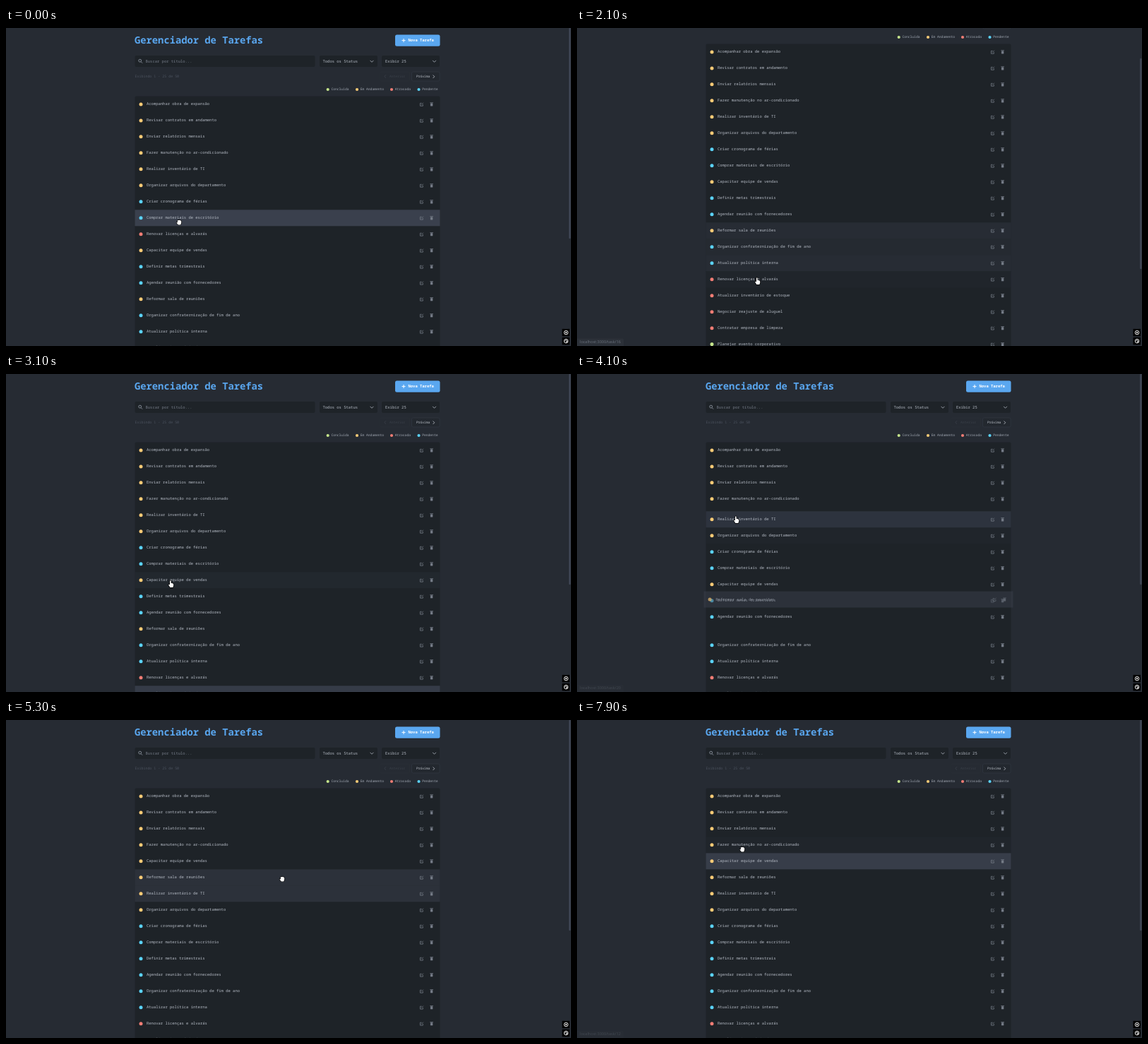
An HTML page with a canvas for the animation above (8 s loop, 800 px wide and 450 px high).

```html
<!DOCTYPE html>
<html lang="pt-BR">
<head>
<meta charset="utf-8">
<title>Gerenciador de Tarefas</title>
<style>
html, body { margin: 0; width: 100%; height: 100%; overflow: hidden; background: #262b33; }
canvas { display: block; }
</style>
</head>
<body>
<canvas id="stage" width="800" height="450"></canvas>
<script>
const ctx = document.getElementById('stage').getContext('2d');
const LOOP = 8000, STEP = 100, SLIDE = 300, FADE = 300;
const TOP = 96.4, ROW = 22.985, LEFT = 182.5, WIDTH = 432;
const DOT = { g: '#c5e58b', y: '#fccb76', r: '#f27d75', b: '#5bd3f9' };
const BG = '#262b33', PANEL = '#1e2328', BLUE = '#5aa7f0';

// The first letter of each line is the status colour.
const parse = text => text.trim().split('\n').map(s => ({ dot: DOT[s[0]], name: s.slice(2) }));
const firstPage = parse(`
y Acompanhar obra de expansão
y Revisar contratos em andamento
y Enviar relatórios mensais
y Fazer manutenção no ar-condicionado
y Realizar inventário de TI
y Organizar arquivos do departamento
b Criar cronograma de férias
b Comprar materiais de escritório
r Renovar licenças e alvarás
y Capacitar equipe de vendas
b Definir metas trimestrais
b Agendar reunião com fornecedores
y Reformar sala de reuniões
b Organizar confraternização de fim de ano
b Atualizar política interna
r Atualizar inventário de estoque
r Negociar reajuste de aluguel
r Contratar empresa de limpeza
g Planejar evento corporativo
g Revisar plano de segurança
g Atualizar cadastro de clientes
g Preparar folha de pagamento
g Conferir notas fiscais
g Trocar lâmpadas do corredor
g Arquivar documentos antigos`);
const secondPage = parse(`
b Treinar equipe para atendimento telefônico
b Criar roteiro de atendimento ao cliente
b Agendar inspeção predial
y Atualizar mural de aniversariantes
r Recolher assinaturas em documentos
y Atualizar quadro de avisos interno
y Solicitar orçamentos para reforma
g Inspecionar extintores de incêndio
y Preparar lista de presença para evento
g Organizar almoxarifado
g Montar kit de boas-vindas para novos funcionários
b Reservar hotel para viagem de negócios
y Criar lista de fornecedores alternativos
g Atualizar informações no site institucional
b Criar manual de uso da sala de reunião
b Revisar lista de ramais`);

const moves = [
  { at: 1200, from: 8, to: 14 },
  { at: 4000, from: 11, to: 4 },
  { at: 4800, from: 9, to: 4 },
];
const cursorKeys = [
  [0, 245, 275], [200, 242, 290], [600, 240, 290], [1150, 248, 430], [1700, 250, 428],
  [1925, 256, 358], [2150, 256, 358], [2500, 240, 300], [3100, 234, 297], [3400, 236, 360],
  [3900, 236, 360], [3930, 226, 206], [4150, 226, 206], [4450, 235, 314], [4700, 235, 314],
  [4800, 240, 200], [4920, 260, 200], [5000, 320, 245], [5160, 350, 243], [5170, 352, 228],
  [5300, 391, 225], [5700, 594, 70], [6000, 594, 70], [6300, 563, 70], [6700, 563, 70],
  [7200, 240, 255], [7550, 240, 202], [7880, 236, 197], [7900, 234, 183],
];
const scrollKeys = [
  [1990, 0], [2000, 50], [2080, 50], [2085, 74], [2100, 74], [2300, 152], [3050, 152], [3065, 0],
];
const linkHints = [[500, 700, 16], [1550, 2300, 16], [3750, 3950, 20], [4550, 4900, 12], [7350, 7750, 12]];

const clamp = v => Math.max(0, Math.min(1, v));
const smooth = p => p * p * (3 - 2 * p);
function track(keys, t) {
  const i = keys.findIndex(k => k[0] > t);
  if (i < 0) return keys.at(-1).slice(1);
  if (!i) return keys[0].slice(1);
  const a = keys[i - 1], b = keys[i], p = (t - a[0]) / (b[0] - a[0]);
  return a.slice(1).map((v, j) => v + (b[j + 1] - v) * p);
}

const onSecondPage = t => t >= 5800 && t < 6500;

// Rows with their centre y in page coordinates.
function layout(t) {
  if (onSecondPage(t)) return secondPage.map((task, i) => ({ task, y: TOP + (i + .5) * ROW }));
  let order = firstPage, before = order, p = 1, lifted = null;
  for (const m of moves.filter(m => t >= m.at)) {
    before = order;
    order = before.slice();
    const [task] = order.splice(m.from, 1);
    order.splice(m.to, 0, task);
    p = clamp((t - m.at) / SLIDE);
    lifted = p < 1 ? task : null;
  }
  const rows = order.map((task, i) => {
    const slot = before.indexOf(task);
    return { task, y: TOP + (slot + (i - slot) * smooth(p) + .5) * ROW, lifted: task === lifted };
  });
  return rows.sort((a, b) => !!a.lifted - !!b.lifted);
}

function hoveredRow(t) {
  const [x, y] = track(cursorKeys, t), [scroll] = track(scrollKeys, t);
  if (x < LEFT || x > LEFT + WIDTH) return null;
  return layout(t).findLast(r => Math.abs(y + scroll - r.y) < ROW / 2);
}

// Share of the recent past that the cursor spent on each row.
function hoverLevels(t) {
  const levels = new Map(), n = 12;
  for (let i = 0; i < n; i++) {
    const row = hoveredRow(Math.max(0, t - i * FADE / n));
    if (row) levels.set(row.task, (levels.get(row.task) || 0) + 1 / n);
  }
  return levels;
}

function text(s, x, y, size, color, weight = 400, family = '"Noto Sans Mono", monospace') {
  ctx.font = `${weight} ${size}px ${family}`;
  ctx.fillStyle = color;
  ctx.fillText(s, x, y);
}
function box(x, y, w, h, r, fill, stroke) {
  ctx.beginPath();
  ctx.roundRect(x, y, w, h, r);
  if (fill) { ctx.fillStyle = fill; ctx.fill(); }
  if (stroke) { ctx.strokeStyle = stroke; ctx.lineWidth = .6; ctx.stroke(); }
}
function dot(x, y, r, color) {
  ctx.beginPath();
  ctx.arc(x, y, r, 0, 7);
  ctx.fillStyle = color;
  ctx.fill();
}
function icon(d, x, y, color, width = .8) {
  ctx.save();
  ctx.translate(x, y);
  ctx.strokeStyle = color;
  ctx.lineWidth = width;
  ctx.stroke(new Path2D(d));
  ctx.restore();
}
const DOWN = 'M-2.4-1.1L0 1.3L2.4-1.1', RIGHT = 'M-1-2.2L1.2 0L-1 2.2', BACK = 'M1-2.2L-1.2 0L1 2.2';

function header(second) {
  text('Gerenciador de Tarefas', 182, 18, 13.8, BLUE, 700);
  box(551, 9.5, 63.5, 16.3, 2.5, BLUE);
  icon('M-2.5 0H2.5M0-2.5V2.5', 563, 17.6, '#fff', 1);
  text('Nova Tarefa', 569.5, 17.8, 5.51, '#fff', 600);

  for (const [x, w] of [[182.5, 255], [444, 82], [532, 82]]) box(x, 39, w, 16, 2, PANEL);
  icon('M1.3-.6A1.9 1.9 0 1 1-2.5-.6A1.9 1.9 0 1 1 1.3-.6M.8.9L2.8 2.9', 190.3, 46.8, '#9aa1ac');
  text('Buscar por título...', 197.5, 47, 5.51, '#747b87');
  text('Todos os Status', 448.5, 47, 5.51, '#b4bac4');
  text('Exibir 25', 537, 47, 5.51, '#b4bac4');
  icon(DOWN, 518, 47, '#b4bac4');
  icon(DOWN, 606.5, 47, '#b4bac4');

  text(second ? 'Exibindo 26 - 50 de 50' : 'Exibindo 1 - 25 de 50', 182.5, 68.7, 4.98, '#4b525e');
  const off = '#3b414b', on = '#c2c7cf';
  box(529, 62, 42.5, 13, 2, second ? '#2b3039' : null, second ? '#59606c' : '#2a2f37');
  icon(BACK, 537, 68.5, second ? on : off);
  text('Anterior', 543, 68.6, 4.6, second ? on : off, 500);
  box(574.5, 62, 39.5, 13, 2, second ? null : '#23282f', second ? '#2a2f37' : '#353b45');
  text('Próxima', 581, 68.8, 4.6, second ? off : on, 500);
  icon(RIGHT, 605.5, 68.8, second ? off : on);

  const legend = [['g', 455.7, 'Concluída'], ['y', 497, 'Em Andamento'], ['r', 546, 'Atrasada'], ['b', 584.5, 'Pendente']];
  for (const [key, x, label] of legend) {
    dot(x, 87, 2.1, DOT[key]);
    text(label, x + 4.7, 87, 4.65, '#a4abb6');
  }
}

function drawRow({ task, y, lifted }, level) {
  ctx.save();
  ctx.translate(398, y);
  if (lifted) { ctx.scale(1.014, 1); ctx.globalAlpha = .65; }
  ctx.translate(-398, 0);
  if (level || lifted) {
    ctx.save();
    ctx.globalAlpha = lifted ? .5 : level;
    ctx.fillStyle = '#3a404d';
    ctx.fillRect(LEFT, -ROW / 2, WIDTH, ROW);
    ctx.restore();
  }
  dot(191, 0, 2.5, task.dot);
  text(task.name, 199, 0, 5.51, '#b4bac4');
  icon('M0-1.7H-2.2V2.2H1.7V0M-.8.8L2.3-2.3', 588.6, .2, '#747b86');
  box(600.9, -1.4, 3.4, 4, .5, '#747b86');
  ctx.fillRect(600.3, -2.5, 4.6, .8);
  ctx.restore();
}

const hands = {
  pointer: 'M-2-4.3Q-1.2-5.3-.4-4.3V-1.2Q2.8-1 3.2.4V2.6L2.3 5H-1.7L-4 1.3Q-3.4.2-2 1Z',
  grab: 'M-2.2.4V-2.4Q-1.6-3.3-.9-2.7Q-.2-3.7.6-2.9Q1.3-3.5 1.9-2.6Q3-2.7 3.2-1.4V.8L2.2 3.4H-1.3L-3.6.4Q-3.2-.6-2.2.4Z',
  arrow: 'M-3-5V4L-.9 2.1L.5 5L2 4.3L.7 1.5H3.5Z',
};
function drawCursor(t, scroll) {
  const [x, y] = track(cursorKeys, t), row = hoveredRow(t);
  let kind = 'arrow';
  if (row) {
    const onLink = Math.abs(y + scroll - row.y) < 5.9 && x < 199 + row.task.name.length * 3.31;
    kind = onLink ? 'pointer' : 'grab';
  } else if (x > 529 && x < 614 && y > 61 && y < 76) kind = 'pointer';
  const shape = new Path2D(hands[kind]);
  ctx.save();
  ctx.translate(x, y);
  ctx.lineWidth = 1.3;
  ctx.strokeStyle = '#000';
  ctx.stroke(shape);
  ctx.fillStyle = '#fff';
  ctx.fill(shape);
  ctx.restore();
}

function overlays(t, scroll) {
  box(797, scroll * 43 / 74, 2.6, 298, 1, '#3e4553');
  for (const y of [431, 443]) {
    ctx.fillStyle = '#000';
    ctx.fillRect(787.5, y - 5.2, 10.5, 10.4);
    icon('M2.8 0A2.8 2.8 0 1 1-2.8 0A2.8 2.8 0 1 1 2.8 0', 793, y, '#fff', .9);
  }
  icon('M-1.1-1.1L1.1 1.1M-1.1 1.1L1.1-1.1', 793, 431, '#fff', .9);
  icon('M-1.2 0A1.2 1.2 0 1 1 0 1.2H2.4', 793, 443, '#fff', .8);

  for (const [from, to, id] of linkHints) {
    if (t < from) continue;
    ctx.globalAlpha = clamp(1 - (t - to) / 250);
    box(-2, 439.5, 68, 13, 1.5, '#2c3139');
    text(`localhost:3000/task/${id}`, 4, 444.5, 5.5, '#6b727d', 400, '"Open Sans", sans-serif');
    ctx.globalAlpha = 1;
  }
}

function draw(t) {
  const [scroll] = track(scrollKeys, t), levels = hoverLevels(t);
  ctx.textBaseline = 'middle';
  ctx.textRendering = 'geometricPrecision';
  ctx.fillStyle = BG;
  ctx.fillRect(0, 0, 800, 450);
  ctx.save();
  ctx.translate(0, -scroll);
  header(onSecondPage(t));
  box(LEFT, TOP, WIDTH, ROW * 25, 2, PANEL);
  for (const row of layout(t)) drawRow(row, levels.get(row.task) || 0);
  ctx.restore();
  overlays(t, scroll);
  drawCursor(t, scroll);
}

function tick() {
  const t = performance.now() % LOOP;
  draw(Math.floor(t / STEP) * STEP);
  requestAnimationFrame(tick);
}
tick();
</script>
</body>
</html>
```
